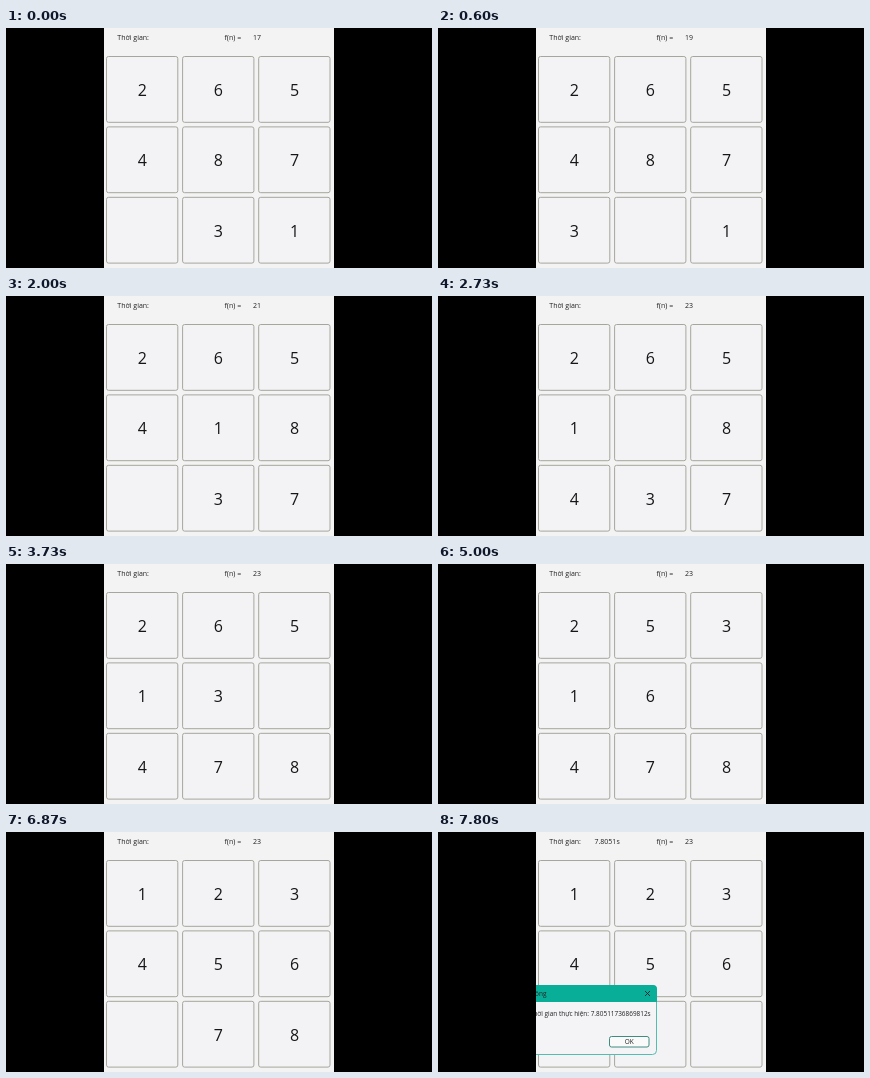
An HTML page that plays this animation: 426 px wide and 240 px high, repeating every 7.87 s.

```html
<!DOCTYPE html>
<html lang="vi">
<head>
<meta charset="utf-8">
<title>8-puzzle</title>
<style>
  html, body { margin: 0; width: 100%; height: 100%; overflow: hidden; background: #000; }
  svg { display: block; width: 426px; height: 240px; }
  text { font: 7px "Open Sans", "Noto Sans", sans-serif; fill: #222; }
  .tile { fill: #f3f3f6; stroke: #a6a69c; }
  .digit { font-size: 16px; text-anchor: middle; fill: #161616; }
  .small { font-size: 6.45px; }
</style>
</head>
<body>
<svg viewBox="0 0 426 240">
  <clipPath id="panel"><path d="M98 0h230v240h-230z"/></clipPath>
  <g clip-path="url(#panel)">
    <path d="M98 0h230v240h-230z" fill="#f3f3f4"/>
    <text x="111.3" y="11.5">Thời gian:</text>
    <text id="time" x="156.5" y="11.5">7.8051s</text>
    <text x="218.5" y="11.5">f(n) =</text>
    <text id="cost" x="247" y="11.5"></text>
    <g id="board"></g>
    <g id="dialog">
      <rect x="60.5" y="153.5" width="158" height="69" rx="4" fill="#f4f4f7" stroke="#52bdb0"/>
      <path d="M60 170V153H215a4 4 0 0 1 4 4V170z" fill="#08ae98"/>
      <text class="small" x="108.5" y="164" text-anchor="end">Thành công</text>
      <path d="M207 159l5 5m0-5l-5 5" stroke="#123" stroke-width=".9"/>
      <text class="small" x="212.7" y="183.5" text-anchor="end">Thời gian thực hiện: 7.80511736869812s</text>
      <rect x="171.5" y="204.5" width="39.5" height="10.5" rx="2" fill="#fafafa" stroke="#3f8c80"/>
      <text class="small" x="191.2" y="212.2" text-anchor="middle">OK</text>
    </g>
  </g>
</svg>
<script>
const LOOP = 7870, STEP = 330, LEAD = 30, DIALOG_AT = 7600;
const START = [2, 6, 5, 4, 8, 7, 0, 3, 1];
const MOVES = [...'3178134137836536521478'].map(Number);
const $ = id => document.getElementById(id);

$('board').innerHTML = START.map((_, i) => {
  const x = 100.5 + 76.1 * (i % 3), y = 28.5 + 70.4 * Math.floor(i / 3);
  return `<rect class="tile" x="${x}" y="${y}" width="71.3" height="65.8" rx="2"/>
    <text class="digit" x="${x + 35.8}" y="${y + 39.4}"></text>`;
}).join('');
const digits = document.querySelectorAll('.digit');

// Each move swaps the named tile with the gap.
function boardAfter(n) {
  const board = [...START];
  for (const tile of MOVES.slice(0, n)) {
    const from = board.indexOf(tile);
    board[board.indexOf(0)] = tile;
    board[from] = 0;
  }
  return board;
}

// Manhattan distance of all tiles to their goal cells.
function distance(board) {
  return board.reduce((sum, tile, i) => {
    if (!tile) return sum;
    const goal = tile - 1;
    return sum + Math.abs(i % 3 - goal % 3) + Math.abs(Math.floor(i / 3) - Math.floor(goal / 3));
  }, 0);
}

let shown = -1;
function draw(now) {
  const t = now % LOOP;
  const n = Math.min(MOVES.length, Math.floor((t + LEAD) / STEP));
  if (n !== shown) {
    const board = boardAfter(n);
    digits.forEach((el, i) => el.textContent = board[i] || '');
    $('cost').textContent = n + 1 + distance(board);
    shown = n;
  }
  const done = t >= DIALOG_AT ? 'inline' : 'none';
  $('time').style.display = $('dialog').style.display = done;
}

const begin = performance.now();
function frame() {
  draw(performance.now() - begin);
  requestAnimationFrame(frame);
}
frame();
</script>
</body>
</html>
```
